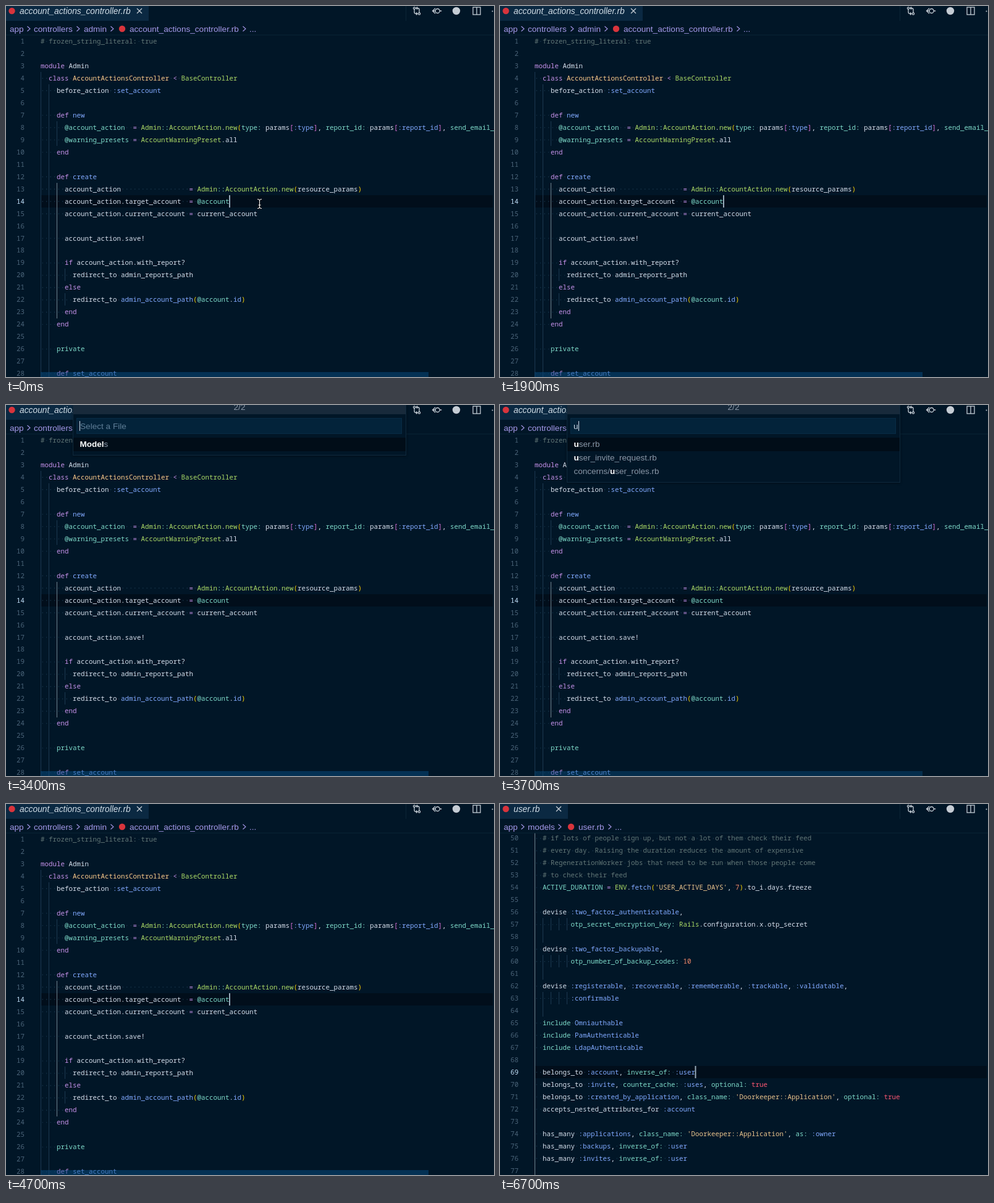
These frames come from a looping animation (790x602 px, 6.8 s). An HTML page:

```html
<!DOCTYPE html>
<html lang="en">
<head>
<meta charset="utf-8">
<title>Editor navigation</title>
<style>
html, body { margin: 0; width: 100%; height: 100%; overflow: hidden; background: #011627; }
#stage { position: relative; width: 790px; height: 602px; overflow: hidden; background: #011627; }
svg { position: absolute; left: 0; top: 0; }
text { white-space: pre; }
.code { font: 10.83px "Noto Sans Mono", monospace; }
.ui, #picker { font: 13.6px "Liberation Sans", Arial, sans-serif; }
.ui.tab { font-style: italic; font-size: 13.8px; fill: #d2dee7; }
.crumb { fill: #a599e9; }
.chev { fill: none; stroke: #a599e9; stroke-width: 1.1; }
.icon { fill: none; stroke: #c5ccd4; stroke-width: 1.3; }
#picker { position: absolute; left: 108px; top: -2px; width: 538px; border: 1px solid #0f293d;
  background: #011627; box-shadow: 0 1px 4px #0006; color: #8b98a8; }
#picker div { position: absolute; white-space: pre; box-sizing: border-box; }
#step { left: 0; top: 0; width: 538px; height: 16px; line-height: 10px; text-align: center; background: #182a3b; }
#input { left: 5px; top: 22px; width: 527px; height: 26px; padding-left: 4px; line-height: 25px;
  background: #03233a; border: 1px solid #082b44; color: #c9d5e2; }
#input i { display: inline-block; width: 1px; height: 16px; background: #d6deeb; vertical-align: -3px; }
#input span { color: #5f7e97; }
.row { left: 0; width: 538px; height: 22px; padding-left: 10.5px; line-height: 22px; font-size: 13.5px; }
.row.on { background: #010d18; }
.row b { color: #fff; }
</style>
</head>
<body>
<div id="stage">
  <svg id="art" width="790" height="602" viewBox="0 0 790 602"></svg>
  <div id="picker"><div id="step"></div><div id="input"></div><div id="list"></div></div>
</div>
<script>
const LOOP = 6800, LEFT = 56, CHAR = 6.5, LINE = 19.97;
const COLORS = {
  c: '#637777', k: '#c792ea', y: '#ffcb8b', g: '#addb67', t: '#7fdbca', b: '#82aaff',
  p: '#ffd700', o: '#da70d6', s: '#ecc48d', n: '#f78c6c', r: '#ff5874'
};

// {x...} colours a token; everything else is plain text.
const CONTROLLER = {
  first: 1, top: 57, active: 14, caret: 47, tab: 231, name: 'account_actions_controller.rb',
  crumbs: [['app', 6], ['controllers', 45], ['admin', 126], ['account_actions_controller.rb', 200], ['...', 394]],
  chevs: [37, 117, 172, 386], badge: 188,
  guides: [[0, 4, 28], [2, 5, 28], [4, 8, 9], [4, 13, 23, 1], [6, 20, 20], [6, 22, 22]],
  code: `{c# frozen_string_literal: true}

{kmodule} Admin
  {kclass} {yAccountActionsController} {k<} {gBaseController}
    before_action {b:set_account}

    {kdef} {bnew}
      {t@account_action}  {k=} {gAdmin}{t::}{gAccountAction}.{gnew}{p(}{ttype:} params{o[}{b:type}{o]}, {treport_id:} params{o[}{b:report_id}{o]}, {tsend_email_}
      {t@warning_presets} {k=} {gAccountWarningPreset}.all
    {kend}

    {kdef} {bcreate}
      account_action                 {k=} {gAdmin}{t::}{gAccountAction}.{gnew}{p(}resource_params{p)}
      account_action.target_account  {k=} {t@account}
      account_action.current_account {k=} current_account

      account_action.save!

      {kif} account_action.with_report?
        redirect_to admin_reports_path
      {kelse}
        redirect_to {badmin_account_path}{p(}{t@account}.{bid}{p)}
      {kend}
    {kend}

    {tprivate}

    {kdef} {bset_account}`
};

const MODEL = {
  first: 50, top: 55.4, active: 69, caret: 40, tab: 110, name: 'user.rb',
  crumbs: [['app', 6], ['models', 45], ['user.rb', 127], ['...', 186]],
  chevs: [37, 97, 178], badge: 115,
  guides: [[0, 50, 77, 1], ...[57, 60, 63].flatMap(n => [[2, n, n + 1], [4, n, n], [6, n, n], [8, n, n]])],
  code: `  {c# if lots of people sign up, but not a lot of them check their feed}
  {c# every day. Raising the duration reduces the amount of expensive}
  {c# RegenerationWorker jobs that need to be run when those people come}
  {c# to check their feed}
  {tACTIVE_DURATION} {k=} {gENV}.{bfetch}{p(}{s'USER_ACTIVE_DAYS'}, {n7}{p)}.to_i.days.freeze

  devise {b:two_factor_authenticatable},
         {totp_secret_encryption_key:} {gRails}.configuration.x.otp_secret

  devise {b:two_factor_backupable},
         {totp_number_of_backup_codes:} {n10}

  devise {b:registerable}, {b:recoverable}, {b:rememberable}, {b:trackable}, {b:validatable},
         {b:confirmable}

  {tinclude} {bOmniauthable}
  {tinclude} {bPamAuthenticable}
  {tinclude} {bLdapAuthenticable}

  belongs_to {b:account}, {tinverse_of:} {b:user}
  belongs_to {b:invite}, {tcounter_cache:} {b:uses}, {toptional:} {rtrue}
  belongs_to {b:created_by_application}, {tclass_name:} {s'Doorkeeper::Application'}, {toptional:} {rtrue}
  accepts_nested_attributes_for {b:account}

  has_many {b:applications}, {tclass_name:} {s'Doorkeeper::Application'}, {tas:} {b:owner}
  has_many {b:backups}, {tinverse_of:} {b:user}
  has_many {b:invites}, {tinverse_of:} {b:user}
`
};

const esc = s => s.replace(/&/g, '&amp;').replace(/</g, '&lt;');
const rect = (x, y, w, h, fill, extra = '') =>
  `<rect x="${x}" y="${y}" width="${w}" height="${h}" fill="${fill}" ${extra}/>`;
const label = (x, y, s, cls) => `<text x="${x}" y="${y}" class="ui ${cls}">${esc(s)}</text>`;
const badge = (x, y) => `<circle cx="${x}" cy="${y}" r="5.2" fill="#d8343c"/>`;

function codeLine(src, y) {
  let col = 0, out = '', dots = '';
  for (const [all, cls, body] of src.matchAll(/\{(\w)([^}]*)\}|[^{]+/g)) {
    const s = body ?? all;
    const lead = s.length - s.trimStart().length;
    if (s.trim()) {
      out += `<text x="${LEFT + (col + lead) * CHAR}" y="${y + 4}" fill="${COLORS[cls] || '#d6deeb'}">${esc(s.trim())}</text>`;
    }
    for (const ch of s) {
      if (ch === ' ') dots += `M${LEFT + col * CHAR + 2.7} ${y + .5}h1.1`;
      col++;
    }
  }
  return out + `<path d="${dots}" stroke="#203f57" stroke-width="1.1"/>`;
}

function fileView(f, id) {
  const yOf = n => f.top + (n - f.first) * LINE;
  const xOf = col => Math.round(LEFT + col * CHAR);
  const rowTop = Math.round(yOf(f.active) - 10);
  let s = rect(LEFT, rowTop, 732, 20, '#010e1b');
  for (const [col, from, to, on] of f.guides) {
    s += rect(xOf(col), Math.round(yOf(from) - 10), 1, Math.round((to - from + 1) * LINE), on ? '#71818d' : '#1c3850');
  }
  f.code.split('\n').forEach((src, i) => {
    const n = f.first + i, y = yOf(n);
    s += `<text x="30" y="${y + 4}" text-anchor="end" fill="${n === f.active ? '#c5e4fd' : '#4b6479'}">${n}</text>`;
    s += codeLine(src, y);
  });
  s = `<g class="code">${s}</g>`;
  s += rect(LEFT + f.caret * CHAR - .5, rowTop, 2, 20, '#98a9b8', `id="${id}Caret"`);
  s += rect(0, 0, 790, 47, '#011627') + rect(0, 46.5, 790, 1, '#0b2437');
  s += rect(0, 0, f.tab, 24, '#0b2942');
  s += badge(9.5, 8) + label(22, 12.5, f.name, 'tab');
  const x = f.tab - 15;
  s += `<path d="M${x - 4} 4l8 8m0-8l-8 8" class="icon" stroke-width="1.1"/>`;
  s += badge(f.badge, 37) + f.crumbs.map(([t, cx]) => label(cx, 41.5, t, 'crumb')).join('');
  s += f.chevs.map(c => `<path class="chev" d="M${c - 2.5} 33l4.5 4-4.5 4"/>`).join('');
  return `<g id="${id}">${s}</g>`;
}

const toolbar = rect(647, 0, 1, 24, '#0c2436') + `<g class="icon">
  <circle cx="661" cy="3.5" r="1.6"/><circle cx="669" cy="12.5" r="1.6"/>
  <path d="M661 5v5q0 2.5 3 2.5h2m-2-2l2 2-2 2M669 11V6q0-2.5-3-2.5h-2m2-2l-2 2 2 2"/>
  <path d="M695 3.8L690.5 8l4.5 4.2M690.5 8h4.5M702.2 8h3"/><circle cx="698.6" cy="8" r="3.5"/>
  <rect x="756" y="2" width="12" height="12"/><path d="M762 2v12"/></g>
  <circle cx="729" cy="8" r="6.2" fill="#c5ccd4"/><circle cx="787.5" cy="8.5" r="1" fill="#c5ccd4"/>`;

const beam = 'M-3.5-7.5q3.5 0 3.5 2.5v10q0 2.5-3.5 2.5M3.5-7.5q-3.5 0-3.5 2.5v10q0 2.5 3.5 2.5M-2 2h4';
const $ = id => document.getElementById(id);
$('art').innerHTML = fileView(CONTROLLER, 'controller') + fileView(MODEL, 'model') + toolbar
  + rect(56, 594, 628, 8, '#084d81', 'id="bar"')
  + `<g id="mouse" fill="none"><path d="${beam}" stroke="#000" stroke-width="2.2"/>
     <path d="${beam}" stroke="#fff" stroke-width="1.1"/></g>`;

const FOLDERS = ['Models'];
const FILES = ['user.rb', 'user_invite_request.rb', 'concerns/user_roles.rb'];
const OPEN = 2000, CLOSE = 4550, SWITCH = 4800;

// start time, step, typed text, rows, highlighted match
const typing = (word, start, gap, step, rows) =>
  [...word].map((_, i) => {
    const q = word.slice(0, i + 1);
    return [start + i * gap, step, q, rows, q];
  });
const STATES = [
  [OPEN, 1, '', FOLDERS, ''],
  ...typing('model', 2500, 120, 1, FOLDERS),
  [3300, 2, '', FOLDERS, 'model'],
  [3500, 2, '', FILES, ''],
  ...typing('use', 3700, 125, 2, FILES),
  [4150, 2, 'user', FILES, 'user']
];

function row(name, i, match) {
  const at = name.toLowerCase().indexOf(match), end = at + match.length;
  const html = name.slice(0, at) + `<b>${name.slice(at, end)}</b>` + name.slice(end);
  return `<div class="row${i ? '' : ' on'}" style="top:${54 + 22 * i}px">${html}</div>`;
}

let shown;
function showPicker(state) {
  if (state === shown) return;
  shown = state;
  const [, step, query, rows, match] = state;
  $('step').textContent = step + '/2';
  $('input').innerHTML = query ? query + '<i></i>' : '<i></i><span>Select a File</span>';
  $('list').innerHTML = rows.map((r, i) => row(r, i, match)).join('');
  $('picker').style.height = 60 + 22 * rows.length + 'px';
}

const show = (id, on) => { $(id).style.display = on ? '' : 'none'; };

function draw(t) {
  const picking = t >= OPEN && t < CLOSE, later = t >= SWITCH;
  show('controller', !later);
  show('model', later);
  show('picker', picking);
  show('controllerCaret', !picking);
  if (picking) showPicker(STATES.findLast(s => s[0] <= t));

  const fade = picking ? Math.min(1, Math.max(0, (t - 3600) / 600)) : 0;
  $('bar').setAttribute('opacity', later ? 0 : .5 * (1 - fade));

  show('mouse', t < 1800 || (t >= 5300 && t < 6300));
  $('mouse').setAttribute('transform', later ? 'translate(415.5 454)' : 'translate(410.5 321)');
}

const start = performance.now();
function tick() {
  draw((performance.now() - start) % LOOP);
  requestAnimationFrame(tick);
}
tick();
</script>
</body>
</html>
```
